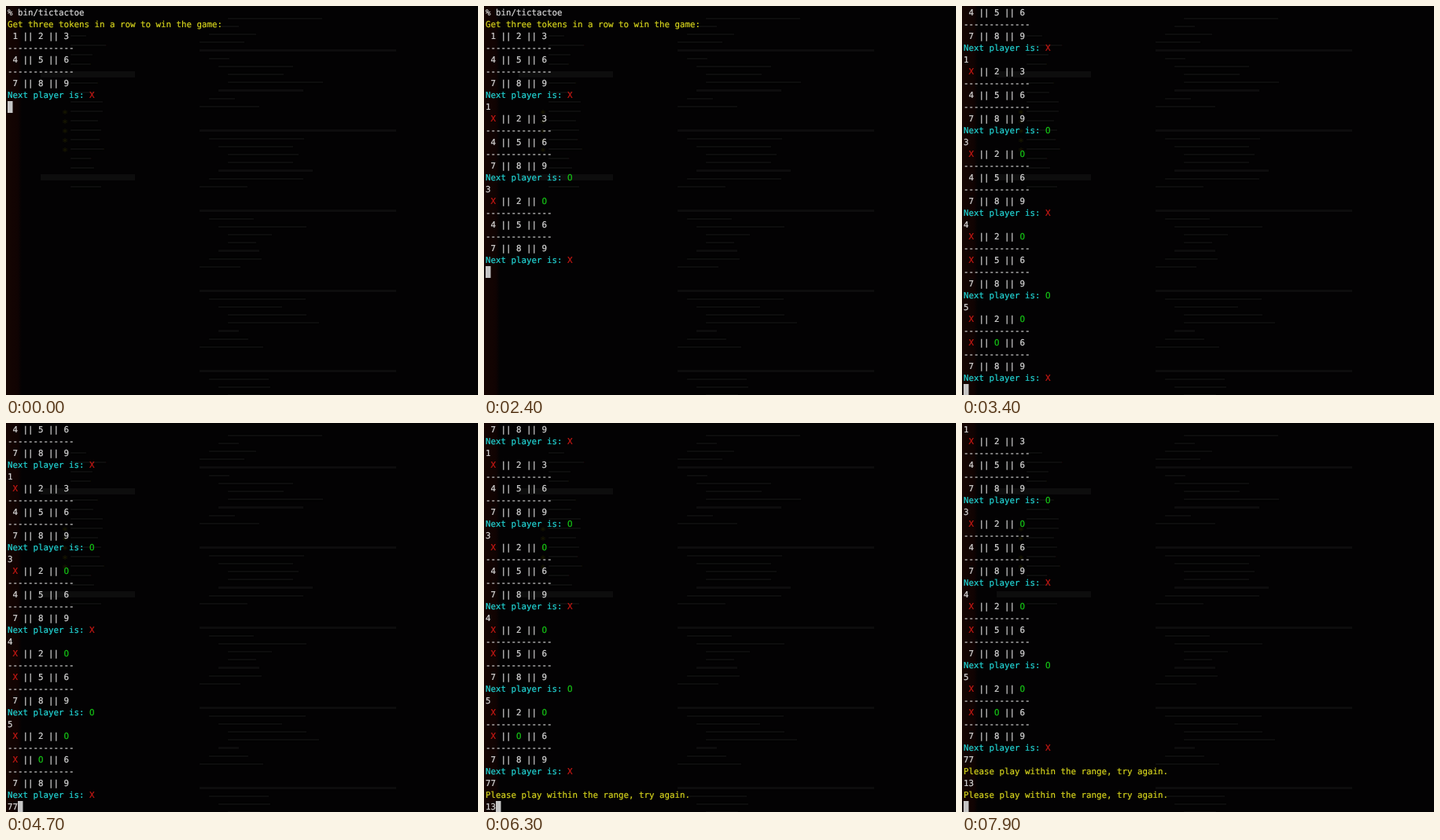
Recreate the animation shown at these times as an HTML page. Size 600 by 495 pixels, loop 8 s.

```html
<!DOCTYPE html>
<html lang="en">
<head>
<meta charset="utf-8">
<title>Terminal game</title>
<style>
  html, body { margin: 0; width: 100%; height: 100%; overflow: hidden; background: #030203; }
  svg { display: block; width: 100%; height: 100%; }
  text {
    font: 10.8px "DejaVu Sans Mono", "Liberation Mono", monospace;
    white-space: pre;
    text-rendering: geometricPrecision;
  }
  tspan { fill: currentColor; stroke: currentColor; stroke-width: .22px; }
</style>
</head>
<body>
<svg viewBox="0 0 600 495">
  <defs>
    <linearGradient id="edge">
      <stop offset="0" stop-color="#150502"/>
      <stop offset=".75" stop-color="#100302"/>
      <stop offset="1" stop-color="#030203"/>
    </linearGradient>
    <filter id="soft" x="-5%" y="-5%" width="110%" height="110%"><feGaussianBlur stdDeviation="1.2"/></filter>
  </defs>
  <rect width="600" height="495" fill="#030203"/>
  <rect width="20" height="495" fill="url(#edge)"/>
  <g id="ghost" filter="url(#soft)"></g>
  <g id="screen"></g>
  <rect id="cursor" width="6.5" height="15" fill="#c6c6c6"/>
</svg>
<script>
const LOOP = 8000, CELL = 6.5, ROW = 15, LEFT = 2, LAST_ROW = 32;
const WHITE = '#d6d6d6', YELLOW = '#d2d01c', CYAN = '#22d2d2', RED = '#c41814', GREEN = '#16c016';
const $ = id => document.getElementById(id);
const screen = $('screen'), cursor = $('cursor'), ghost = $('ghost');

function add(parent, tag, attrs, content = '') {
  const el = document.createElementNS('http://www.w3.org/2000/svg', tag);
  for (const key in attrs) el.setAttribute(key, attrs[key]);
  el.textContent = content;
  parent.append(el);
  return el;
}

// Faint editor window seen through the terminal
let seed = 7;
const random = () => (seed = seed * 16807 % 2147483647) / 2147483647;
const bar = (x, y, width, height, fill) => add(ghost, 'rect', { x, y, width, height, fill });

for (const y of [83, 214]) bar(44, y, 120, 8, '#0b0a0b');
for (let y = 38; y < 235; y += 12) bar(82, y - 1.5, 20 + random() * 28, 3, '#090807');
for (let y = 135; y < 190; y += 12) bar(73, y - 2, 4, 4, '#151204');
for (let i = 0; i < 48; i++) {
  const step = i % 10;  // each block: a long heading, indented body, blank gap
  if (step > 7) continue;
  const indent = 12 * Math.min(step, 7 - step, 3);
  const width = step ? 20 + random() * 110 : 250;
  bar(246 + indent, 55 + i * 10.2 - 102 * (i > 43) * 4.8, width, 3, step ? '#080808' : '#0c0c07');
}

// Terminal rows and typed keys know when they appear
const rows = [];
const tokenColor = token => token === 'X' ? RED : token === 'O' ? GREEN : WHITE;

function print(time, ...parts) {
  const el = add(screen, 'text', { x: LEFT, y: rows.length * ROW + 11.6 });
  for (const [content, color] of parts) add(el, 'tspan', { color }, content);
  const row = { el, time, keys: [] };
  rows.push(row);
  return row;
}

function type(row, time, input) {
  [...input].forEach((char, i) => {
    row.keys.push({ el: add(row.el, 'tspan', { color: WHITE }, char), time: time + i * 70 });
  });
}

function printBoard(time, cells, next) {
  const bars = [' || ', WHITE];
  for (let i = 0; i < 9; i += 3) {
    if (i) print(time, ['-------------', WHITE]);
    const [a, b, c] = cells.slice(i, i + 3).map(token => [token, tokenColor(token)]);
    print(time, [' ', WHITE], a, bars, b, bars, c);
  }
  print(time, ['Next player is: ', CYAN], [next, tokenColor(next)]);
}

// Plays the session; each turn is [input, typed at, entered at]
function play(turns) {
  const cells = [...'123456789'];
  let player = 'X';
  print(0, ['% bin/tictactoe', WHITE]);
  print(0, ['Get three tokens in a row to win the game:', YELLOW]);
  printBoard(0, cells, player);
  let prompt = print(0);
  for (const [input, typed, entered] of turns) {
    type(prompt, typed, input);
    if (input > 9) {
      print(entered, ['Please play within the range, try again.', YELLOW]);
    } else {
      cells[input - 1] = player;
      player = player === 'X' ? 'O' : 'X';
      printBoard(entered, cells, player);
    }
    prompt = print(entered);
  }
}

play([
  ['1', 600, 700],
  ['3', 1600, 1700],
  ['4', 2500, 2700],
  ['5', 3150, 3300],
  ['77', 4600, 5000],
  ['13', 6200, 6700]
]);

function reveal(items, time) {
  const shown = items.filter(item => item.time <= time);
  for (const item of items) item.el.style.display = item.time <= time ? '' : 'none';
  return shown;
}

function draw(time) {
  const shown = reveal(rows, time);
  const last = shown.length - 1;
  let column = 0;
  for (const row of shown) column = reveal(row.keys, time).length;
  const scroll = Math.max(0, last - LAST_ROW);
  screen.setAttribute('transform', `translate(0 ${-scroll * ROW})`);
  for (const row of rows.slice(0, scroll)) row.el.style.display = 'none';
  cursor.setAttribute('x', LEFT + column * CELL);
  cursor.setAttribute('y', (last - scroll) * ROW + 1);
}

let start;
function tick(now) {
  start ??= now;
  draw((now - start) % LOOP);
  requestAnimationFrame(tick);
}
draw(0);
requestAnimationFrame(tick);
</script>
</body>
</html>
```
